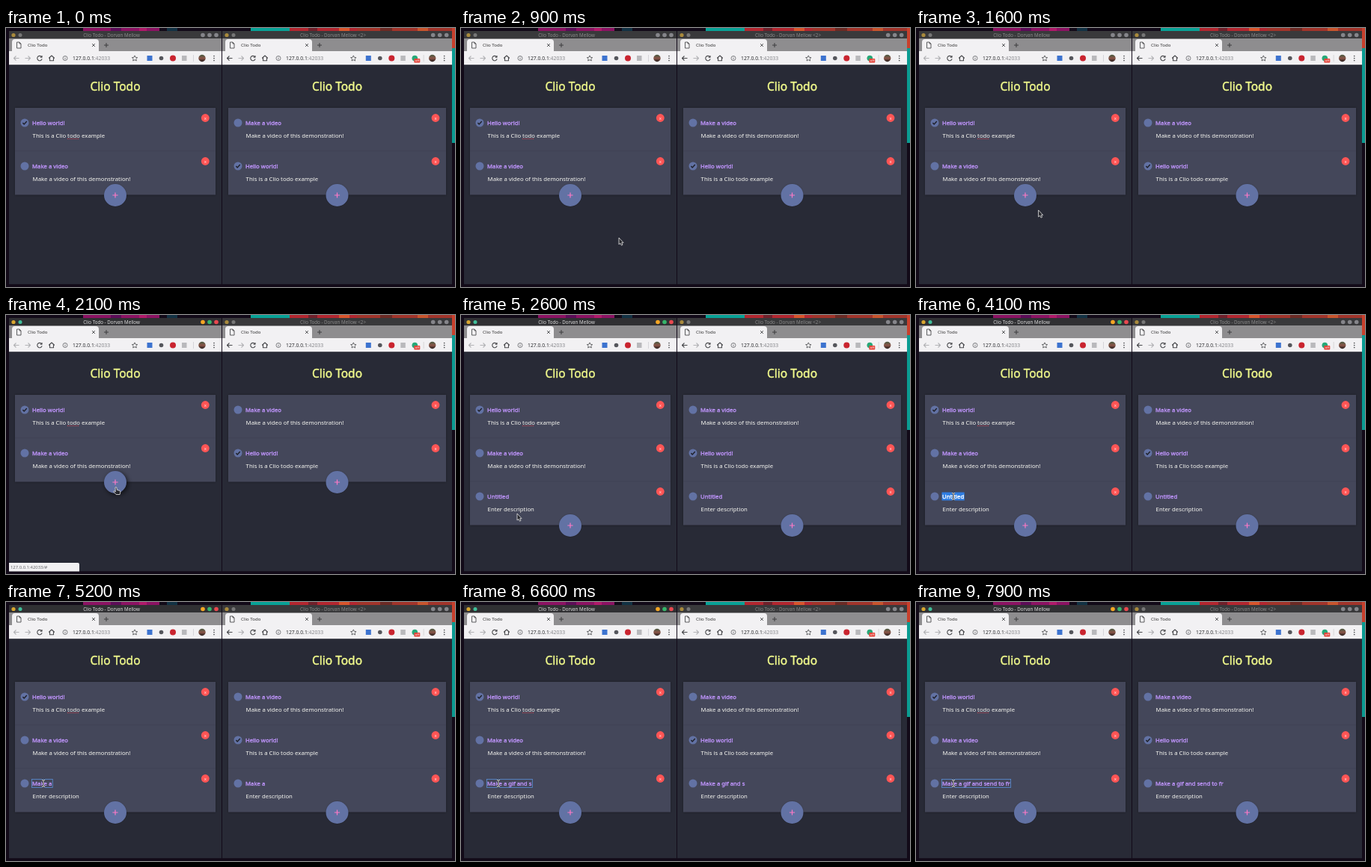
Animation of 600 by 347 pixels, one loop 8000 ms. Source, as an HTML page with a canvas:

```html
<!DOCTYPE html>
<html lang="en">
<head>
<meta charset="utf-8">
<title>Clio Todo</title>
<style>
  html, body { margin: 0; width: 100%; height: 100%; overflow: hidden; background: #120a18; }
  canvas { display: block; width: 600px; height: 347px; }
</style>
</head>
<body>
<canvas id="stage" width="600" height="347"></canvas>
<script>
const c = document.getElementById('stage').getContext('2d');
const LOOP = 8000, STEP = 100;
const FOCUS = 1900, ADD = 2300, LEAVE = 2500, SELECT = 3600, TYPE = 4420, KEY = 140;
const PHRASE = 'Make a gif and send to fr';
const HELLO = ['Hello world!', 'This is a Clio todo example', true];
const VIDEO = ['Make a video', 'Make a video of this demonstration!', false];
// time, x, y of the pointer
const PATH = [[500, 236, 320], [900, 211, 281], [1200, 211, 281], [1800, 147, 231],
  [2300, 147, 231], [2600, 75, 266], [2800, 75, 266], [3400, 50, 243], [8000, 50, 243]];

function rect(x, y, w, h, color) {
  c.fillStyle = color;
  c.fillRect(x, y, w, h);
}

function round(x, y, w, h, r, color) {
  c.fillStyle = color;
  c.beginPath();
  c.roundRect(x, y, w, h, r);
  c.fill();
}

function dot(x, y, r, color) {
  c.fillStyle = color;
  c.beginPath();
  c.arc(x, y, r, 0, 7);
  c.fill();
}

function path(d, x, y, stroke, width = 1, fill) {
  const p = new Path2D(d);
  c.save();
  c.translate(x, y);
  c.lineJoin = 'round';
  if (fill) { c.fillStyle = fill; c.fill(p); }
  c.strokeStyle = stroke;
  c.lineWidth = width;
  c.stroke(p);
  c.restore();
}

function text(s, x, y, size, color, { align = 'left', bold = 0 } = {}) {
  c.font = `${size}px "Noto Sans", "Open Sans", sans-serif`;
  c.textAlign = align;
  c.fillStyle = color;
  c.fillText(s, x, y);
  if (bold) {
    c.strokeStyle = color;
    c.lineWidth = bold;
    c.strokeText(s, x, y);
  }
  return c.measureText(s).width;
}

function wallpaper() {
  rect(0, 0, 600, 347, '#120a18');
  const bands = [[103, 102, '#8c1263'], [140, 14, '#5c0c58'], [178, 10, '#b01a6a'], [215, 14, '#123244'],
    [327, 52, '#08a397'], [379, 90, '#b3262f'], [404, 12, '#70202a'], [445, 14, '#d9552c'],
    [469, 131, '#a2342a'], [500, 16, '#6b2a24'], [550, 14, '#c8552d']];
  for (const [x, w, color] of bands) rect(x, 0, w, 4, color);
  rect(596, 0, 4, 27, '#c8402c');
  rect(596, 27, 4, 127, '#0a9c92');
}

function titleBar(w, focused) {
  rect(w.x, 4, w.w, 10, focused ? '#303033' : '#39393b');
  dot(w.dx + 10, 9.5, 2.6, focused ? '#d9a62e' : '#a98a3c');
  dot(w.dx + 19, 9.5, 2.5, focused ? '#3fbf9a' : '#777');
  text(w.title, w.titleX, 11.8, 6.2, focused ? '#dedede' : '#8b8b8b', { align: 'center' });
  ['#f5a623', '#35b56a', '#e9484f'].forEach((color, i) =>
    dot(w.ex + 263 + 9 * i, 9.5, 2.8, focused ? color : '#85858a'));
}

function tabs(w) {
  const x = w.dx, ink = '#4c4d50';
  rect(w.x, 14, w.w, 17, '#8e8d8f');
  round(x + 8, 15, 116, 18, [4, 4, 0, 0], '#f2f1f3');
  path('M0 0h3.5l2 2v6h-5.5zM3.5 0v2h2', x + 14.5, 19, ink, 0.9);
  text('Clio Todo', x + 29, 25.4, 6.1, '#333');
  path('M-2-2l4 4M2-2l-4 4', x + 117, 23, ink, 0.9);
  path('M-3 0h6M0-3v6', x + 134, 23, '#3c3c3e', 1);
}

function toolbar(w) {
  const x = w.dx, y = 40.5, ink = '#48494c', pale = '#b2b2b5';
  rect(w.x, 31, w.w, 18.5, '#f2f1f3');
  path('M3.5 0h-7M-.5-3l-3 3 3 3', x + 14, y, w.back ? ink : pale, 1.1);
  path('M-3.5 0h7M.5-3l3 3-3 3', x + 29, y, pale, 1.1);
  path('M2.6-1.8a3.2 3.2 0 1 0 .5 2.6M3-3.6v2.4h-2.4', x + 45, y, ink, 1.1);
  path('M-3.8 0l3.8-3.5 3.8 3.5M-2.5-.8v4h5v-4', x + 61, y, ink, 1.1);
  path('M3 0a3 3 0 1 1-6 0a3 3 0 1 1 6 0M0-.4v2M0-1.8v.7', x + 79, y, '#606165', 0.8);
  const host = text('127.0.0.1', x + 89, 43, 6.8, '#2d2e31');
  text(':42033', x + 89 + host, 43, 6.8, '#85868a');

  const e = w.ex - (w.extra ? 15.4 : 0);
  path('M0-3.6l1.1 2.4 2.6.3-1.9 1.8.5 2.6-2.3-1.3-2.3 1.3.5-2.6-1.9-1.8 2.6-.3z', e + 172, y, ink, 0.8);
  rect(e + 188.5, 37, 7, 7, '#3d73cf');
  dot(e + 207.5, y, 2.8, '#55565c');
  dot(e + 223, y, 4, '#c9242f');
  rect(e + 235, 37, 6.5, 7, '#b9b9bc');
  if (w.extra) {
    dot(e + 254, y, 3.8, '#28a878');
    round(e + 253, 41, 8, 5.5, 1, '#e5443a');
    text('off', e + 257, 45.3, 4.2, '#fff', { align: 'center' });
  }
  rect(w.ex + 250, 36, 0.8, 9, '#cfcfd2');
  const g = c.createLinearGradient(0, 36, 0, 45);
  g.addColorStop(0, '#4b5a42');
  g.addColorStop(0.5, '#8a5548');
  g.addColorStop(1, '#2b211f');
  dot(w.ex + 262, y, 4.7, g);
  for (const k of [-3, 0, 3]) dot(w.ex + 278, y + k, 0.85, ink);
}

function item(w, [name, note, done], top, state) {
  const x = w.dx, y = top + 20;
  dot(x + 25, y, 5.5, '#6272a4');
  if (done) path('M-2.6 .1l1.8 1.9 3.6-3.9', x + 25, y, '#20222c', 1.5);
  c.font = '7.75px "Noto Sans", "Open Sans", sans-serif';
  const width = c.measureText(name).width;
  if (state === 'selected') rect(x + 34.5, y - 5.5, width + 1, 11, '#2f7de1');
  text(name, x + 35, y + 2.8, 7.75, state === 'selected' ? '#fff' : '#bd93f9', { bold: 0.35 });
  if (state === 'editing') {
    c.strokeStyle = '#5a8fd8';
    c.lineWidth = 0.8;
    c.strokeRect(x + 34.5, y - 5.5, width + 1.5, 11);
  }
  text(note, x + 35.6, y + 19.7, 7.75, '#f8f8f2');
  if (w.spell && done) {
    c.setLineDash([1, 1]);
    path('M0 0h16', x + 82, top + 41.5, '#e0454f', 0.9);
    c.setLineDash([]);
  }
  dot(w.ex + 266.3, top + 13.5, 5.4, '#ff5555');
  text('x', w.ex + 266.3, top + 15.6, 6, '#ffe3e3', { align: 'center' });
}

function page(w, items, state, hover) {
  rect(w.x, 49.5, w.w, 294, '#282a36');
  text('Clio Todo', w.mid, 83.8, 15.5, '#f1fa8c', { align: 'center', bold: 0.4 });
  const height = 58 * items.length;
  c.save();
  c.shadowColor = '#0005';
  c.shadowBlur = 3;
  rect(w.card, 107, w.cardW, height + 0.5, '#44475a');
  c.restore();
  items.forEach((it, i) => {
    const top = 107 + 58 * i;
    if (i) rect(w.card, top - 0.5, w.cardW, 0.7, '#3e4152');
    item(w, it, top, i === 2 && w.spell ? state : '');
  });
  const y = 107 + height + 1.5;
  c.save();
  c.shadowColor = hover ? '#000a' : '#0004';
  c.shadowBlur = hover ? 6 : 2;
  c.shadowOffsetX = c.shadowOffsetY = hover ? 2 : 0;
  dot(w.mid, y - 0.5, 15, '#6272a4');
  c.restore();
  path('M-3.6 0h7.2M0-3.6v7.2', w.mid, y - 0.5, '#ff79c6', 1.2);
}

const LEFT = { x: 4, w: 284, dx: 0, ex: 0, mid: 146, card: 12, cardW: 268, titleX: 141,
  title: 'Clio Todo - Dorvan Mellow', spell: true };
const RIGHT = { x: 289, w: 307, dx: 285, ex: 307.7, mid: 442.5, card: 297, cardW: 291, titleX: 437,
  title: 'Clio Todo - Dorvan Mellow <2>', back: true, extra: true };

function browser(w, focused, ...content) {
  c.save();
  c.beginPath();
  c.rect(w.x, 4, w.w, 339.5);
  c.clip();
  titleBar(w, focused);
  tabs(w);
  toolbar(w);
  page(w, ...content);
  c.restore();
}

function pointer(t) {
  if (t < PATH[0][0]) return;
  const i = PATH.findIndex(p => p[0] > t);
  const [t0, x0, y0] = PATH[i - 1], [t1, x1, y1] = PATH[i];
  const k = (t - t0) / (t1 - t0), s = k * k * (3 - 2 * k);
  const x = x0 + (x1 - x0) * s, y = y0 + (y1 - y0) * s;
  if (t >= 3400) {
    const beam = 'M-2-4.5q2 0 2 1q0-1 2-1M0-3.5v7M-2 4.5q2 0 2-1q0 1 2 1';
    path(beam, x, y, '#222', 2);
    path(beam, x, y, '#fff', 0.9);
  } else if (t >= 1800 && t < ADD + 100) {
    path('M-1 0q1-1 1.8 0l.6 3.4 3.6 1q1 .4.9 1.6l-.8 3.5h-5l-3.4-3.8q0-1.2 1.2-.8l1.4 1z',
      x, y, '#e8e8e8', 0.8, '#26272d');
  } else {
    path('M0 0v9l2-1.6 1.4 2.8 1.6-.8-1.3-2.7h2.4z', x, y, '#e8e8e8', 0.8, '#26272d');
  }
}

function draw(t) {
  const typed = t >= TYPE ? PHRASE.slice(0, Math.floor((t - TYPE) / KEY) + 1) : 'Untitled';
  const fresh = t >= ADD ? [[typed, 'Enter description', false]] : [];
  const state = t >= TYPE ? 'editing' : t >= SELECT ? 'selected' : '';
  wallpaper();
  browser(LEFT, t >= FOCUS, [HELLO, VIDEO, ...fresh], state, t >= 1800 && t < ADD);
  browser(RIGHT, false, [VIDEO, HELLO, ...fresh], '', false);
  if (t >= FOCUS && t < LEAVE) {
    round(4, 332, 94, 11.5, [0, 2, 0, 0], '#f2f1f3');
    text('127.0.0.1:42033/#', 6, 340, 5.9, '#66676b');
  }
  pointer(t);
}

function tick() {
  const t = performance.now() % LOOP;
  draw(Math.floor(t / STEP) * STEP);
  requestAnimationFrame(tick);
}
tick();
</script>
</body>
</html>
```
